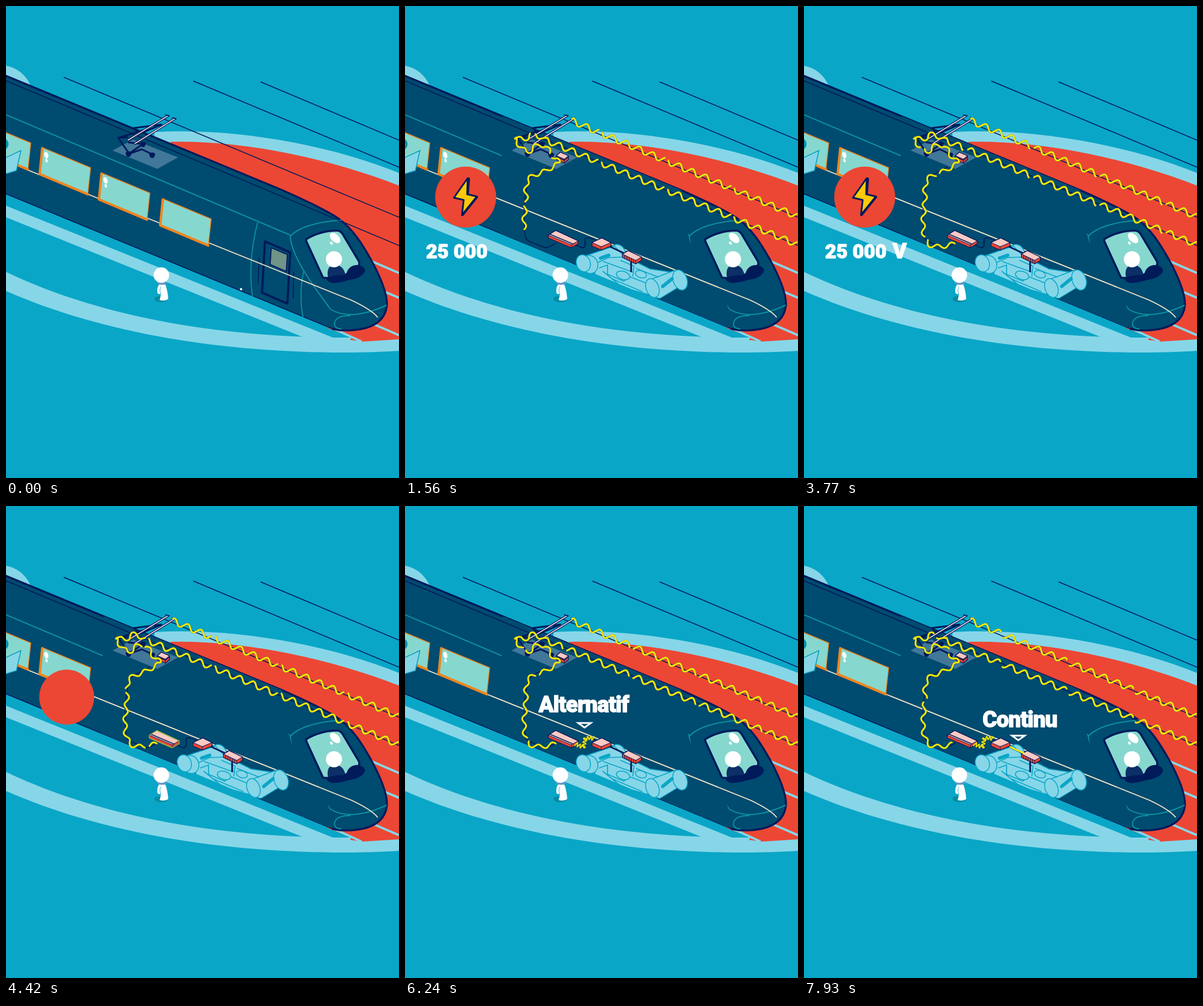
Animation, 683 px wide and 820 px high, one loop 8 s. Source, as an HTML page with a canvas:

```html
<!DOCTYPE html>
<html lang="fr">
<head>
<meta charset="utf-8">
<title>Train électrique</title>
<style>
html, body { margin: 0; width: 100%; height: 100%; overflow: hidden; background: #0aa6c7; }
canvas { display: block; width: 683px; height: 820px; }
</style>
</head>
<body>
<canvas id="stage"></canvas>
<script>
const LOOP = 8000, W = 683, H = 820;
const SEA = '#0aa6c7', PALE = '#86d6e8', RED = '#ec4734', BODY = '#004b70', NAVY = '#001a5a',
  GLASS = '#86d8cf', ORANGE = '#ee861e', CREAM = '#fbeccb', TEAL = '#0d919f', YELLOW = '#ffee00',
  PINK = '#fbc9c3', WHITE = '#ffffff', STEEL = '#417799';
const canvas = document.getElementById('stage');
const ctx = canvas.getContext('2d');
const ratio = window.devicePixelRatio || 1;
canvas.width = W * ratio;
canvas.height = H * ratio;
ctx.lineJoin = 'round';

const clamp = x => Math.max(0, Math.min(1, x));
const ramp = (t, start, dur) => clamp((t - start) / dur);
const backOut = p => 1 + 2.70158 * (p - 1) ** 3 + 1.70158 * (p - 1) ** 2;
const grow = (t, start, dur) => t < start ? 0 : backOut(ramp(t, start, dur));
const popInOut = (t, a, b) => grow(t, a, 350) * (1 - ramp(t, b, 220) ** 2);

function fill(path, color) {
  ctx.fillStyle = color;
  ctx.fill(path);
}
function stroke(path, color, width, cap = 'round') {
  ctx.strokeStyle = color;
  ctx.lineWidth = width;
  ctx.lineCap = cap;
  ctx.stroke(path);
}
const svg = d => new Path2D(d);
const line = (d, color, width, cap) => stroke(svg(d), color, width, cap);
const shape = (d, color) => fill(svg(d), color);

function oval(x, y, rx, ry, rot, color, edge, width) {
  const p = new Path2D();
  p.ellipse(x, y, rx, ry, rot, 0, Math.PI * 2);
  if (color) fill(p, color);
  if (edge) stroke(p, edge, width);
}
const disc = (x, y, r, color) => oval(x, y, r, r, 0, color);

function scaled(x, y, k, draw) {
  if (k <= 0) return;
  ctx.save();
  ctx.translate(x, y);
  ctx.scale(k, k);
  ctx.translate(-x, -y);
  draw();
  ctx.restore();
}

const roofLine = 'M-8 118L478 319Q555 353 579 370C603 388 618 412 634 440C652 473 663 500 662 520C659 547 638 560 604 563Q584 565 568 561';
const trainBody = svg(roofLine + 'L-8 323Z');
const stripe = 'M38 285L600 511Q636 528 646 541';
const coverShape = svg('M170 180L168 262Q152 282 149 305Q145 360 178 420L300 480L480 580L562 570L564 530Q535 460 497 413Q484 385 478 300L250 200Z');

function backdrop() {
  ctx.fillStyle = SEA;
  ctx.fillRect(0, 0, W, H);
  disc(-10, 160, 57, PALE);
  shape('M0 347L573 578L523 578L0 367Z', PALE);
  shape('M258 219C395 211 560 240 683 290V340H258Z', PALE);
  shape('M285 236C412 233 560 264 683 312V580L620 584H598V575L560 560L285 236Z', RED);
  shape('M0 462C180 548 400 577 600 576L598 580L620 583L683 579V599C655 601 620 602 590 602C380 602 170 570 0 495Z', PALE);
  line('M568 560L618 583', PALE, 4, 'butt');
  line('M630 441L683 464M650 493L683 507M630 549L683 572', PALE, 4, 'butt');
  line('M326 130.500L683 280M443 132L683 233M101 124L683 367', NAVY, 1.6);
}

function pane(x, y, shine) {
  ctx.save();
  ctx.translate(x, y);
  const p = svg('M5 0L89 35L84 81L0 46Z');
  fill(p, GLASS);
  stroke(p, ORANGE, 1.5);
  line('M5 1L0.500 46L84 81', ORANGE, 4.2);
  if (shine) {
    oval(12, 13, 3.5, 5.8, -0.3, WHITE);
    oval(12.500, 22.500, 2, 3.2, -0.2, WHITE);
  }
  ctx.restore();
}

function trainShell() {
  fill(trainBody, BODY);
  stroke(trainBody, NAVY, 1.6);
  line(roofLine, NAVY, 3.4);
  line('M0 189L494 398', TEAL, 2, 'butt');
  line('M437 377Q420 445 428 503', TEAL, 1.8);
  line('M517 462Q509 500 516 540', TEAL, 1.8);
  line('M583 372Q515 377 494 400C497 440 540 493 564 527Q600 548 661 520', TEAL, 2);
  line('M598 538C578 537 570 545 571 554Q572 560 582 561', TEAL, 2);
  line('M450 409L494 428L489 517L445 498Z', NAVY, 3.8);
  const glass = svg('M461 420L489 432L487 461L459 449Z');
  fill(glass, '#6f9488');
  stroke(glass, NAVY, 1.8);
  line('M440 437L438 481M500 463L499 507', NAVY, 1.5);
  disc(408.500, 492, 2, WHITE);
  line(stripe, CREAM, 1.8, 'butt');
  pane(161, 290, true);
  pane(267.500, 335, false);
}

function passengerEnd() {
  pane(-46, 203, false);
  pane(58, 246, true);
  disc(-6, 240, 10.5, '#0795b0');
  const book = svg('M-8 267L26 251L18 286L-8 294Z');
  fill(book, PALE);
  stroke(book, '#0a9dba', 1.5);
}

function cab() {
  const glass = svg('M522 405Q545 391 574 390Q581 390 585 396L613 443Q616 449 611 453L580 474L551 472L523 411Q521 407 522 405Z');
  fill(glass, GLASS);
  shape('M560 474Q555 450 572 450Q589 450 591 474Z', '#0b2f66');
  stroke(glass, NAVY, 3.6);
  shape('M556 472Q575 466 591 468Q594 451 609 450Q623 451 624 460Q619 473 596 476Q578 482 566 481Q558 479 556 472Z', NAVY);
  disc(570, 440, 14, WHITE);
  oval(572, 403, 6.500, 11, -0.8, WHITE);
  oval(565.500, 412, 2, 3, -0.7, WHITE);
}

function pantograph() {
  shape('M185 251L221 232L299 263L263 283Z', STEEL);
  line('M213 255L195 229L238 216M213 257L239 239M195 229L211 228M239 240L213 237M236 249L255 258M213 257L236 249M222 212L270 206L232 222L222 212', NAVY, 3);
  for (const [x, y] of [[213, 256], [238, 239], [254, 258]]) {
    oval(x, y, 5.3, 3.6, 0, NAVY);
    disc(x, y + 2, 4, NAVY);
  }
  const bars = 'M212 233L281 191M224 239L293 196';
  line(bars, NAVY, 4);
  line(bars, '#f5dce0', 1.5);
  line('M277 189L284 191M289 194L296 196', NAVY, 1.5);
}

function bogie() {
  const part = d => { const p = svg(d); fill(p, PALE); stroke(p, SEA, 1.4); };
  const wheel = (x, y, rx, ry) => oval(x, y, rx, ry, -0.35, PALE, SEA, 1.5);
  wheel(370, 430, 13, 16);
  part('M314 434L364 417L380 434L374 446L322 464Z');
  part('M330 448L354 437L384 436L426 457L466 463L470 480L440 506L394 493L330 466Z');
  wheel(321, 449, 14, 16);
  wheel(310, 447, 12, 15);
  part('M424 476L470 459Q484 463 486 482L443 508Q428 506 424 496Z');
  wheel(478, 476, 12, 18);
  wheel(430, 490, 11, 17);
  line('M338 455L352 450L352 466L380 478L390 470L418 481M345 444L395 462M375 442L398 452L396 469M402 456L440 471M360 474L412 496M344 461L372 484', SEA, 1.7);
  oval(379, 468, 12, 7, 0.3, PALE, SEA, 1.5);
  oval(410, 466, 10, 6, 0.3, PALE, SEA, 1.5);
  line('M448 487L464 474M340 438L354 433', SEA, 6);
}

// Isometric box: back, right, front and left corners of the lid, then its depth.
function box(b, r, f, l, depth, rib) {
  const poly = pts => svg('M' + pts.map(p => p.join(' ')).join('L') + 'Z');
  const drop = p => [p[0], p[1] + depth];
  const all = poly([b, r, drop(r), drop(f), drop(l), l]);
  fill(all, RED);
  fill(poly([b, r, f, l]), PINK);
  stroke(all, NAVY, 1.3);
  stroke(poly([b, r, f, l]), NAVY, 1);
  line(`M${f}L${drop(f)}`, NAVY, 1);
  if (rib) for (let k = 1; k < rib; k++) {
    const u = k / rib, x = l[0] + (f[0] - l[0]) * u, y = l[1] + (f[1] - l[1]) * u;
    line(`M${x} ${y}v${depth}`, NAVY, 1);
  }
  return all;
}

function machinery(t) {
  bogie();
  line('M249 280L224 293Q215 297 213 309Q203 350 209 400Q210 406 216 409L241 419Q248 421 253 417L263 412', NAVY, 1.6);
  line('M298 416L308 420Q313 420 313 414V406Q313 402 320 403L330 406', NAVY, 1.8);
  line('M354 417L384 431', NAVY, 3);
  line('M393 443V461', NAVY, 3);
  const first = box([262, 390], [301, 408], [289, 415], [249, 398], 5);
  line('M252 396.500L292 413.500', NAVY, 1.6);
  const second = box([342, 403], [358, 411], [341, 418], [325, 411], 6);
  box([388, 425], [411, 436], [401, 442], [378, 431], 6, 6);
  box([270, 254], [284, 260], [277, 266], [263, 260], 7);
  line('M264 262L277 268L284 262', NAVY, 1.5);
  const glow = (p, start) => {
    ctx.save();
    ctx.globalAlpha = Math.sin(Math.PI * ramp(t, start, 500));
    stroke(p, '#a6c63c', 1.4);
    ctx.restore();
  };
  glow(first, 4200);
  glow(second, 6300);
}

// Smooth curve through a few points, sampled with running length and normals.
function track(pts) {
  const out = [];
  let s = 0;
  for (let i = 0; i < pts.length - 1; i++) {
    const a = pts[Math.max(0, i - 1)], b = pts[i], c = pts[i + 1], d = pts[Math.min(pts.length - 1, i + 2)];
    const n = Math.ceil(Math.hypot(c[0] - b[0], c[1] - b[1]) / 1.2);
    const mix = (u, k) => pts.length < 3 ? b[k] + (c[k] - b[k]) * u :
      0.5 * (2 * b[k] + (c[k] - a[k]) * u + (2 * a[k] - 5 * b[k] + 4 * c[k] - d[k]) * u * u
      + (3 * b[k] - a[k] - 3 * c[k] + d[k]) * u ** 3);
    for (let j = i ? 1 : 0; j <= n; j++) {
      const x = mix(j / n, 0), y = mix(j / n, 1), last = out[out.length - 1];
      if (last) s += Math.hypot(x - last.x, y - last.y);
      out.push({ x, y, s });
    }
  }
  out.forEach((p, i) => {
    const a = out[Math.max(0, i - 1)], b = out[Math.min(out.length - 1, i + 1)];
    const len = Math.hypot(b.x - a.x, b.y - a.y) || 1;
    p.nx = -(b.y - a.y) / len;
    p.ny = (b.x - a.x) / len;
  });
  return out;
}

const overhead = track([[683, 366], [289, 199]]);
const rail = track([[683, 415], [245, 233]]);
const feed = track([[245, 233], [222, 223], [207, 232], [190, 229], [211, 253], [228, 243], [244, 244],
  [259, 265], [268, 272], [245, 286], [214, 302], [210, 340], [207, 385], [215, 412], [235, 418], [262, 413]]);
const railEnd = rail[rail.length - 1].s;
const jumper = track([[296, 413], [310, 418], [314, 404], [329, 404]]);

function wave(path, head, from, amp, length, width, t, gaps) {
  const p = new Path2D();
  let pen = false;
  for (const q of path) {
    const s = q.s + from;
    if (s > head) break;
    const phase = (((s - 367 - 0.2536 * (t - 1040)) % 124.8) + 124.8) % 124.8;
    if (gaps && (phase < 3.2 || phase > 121.600)) { pen = false; continue; }
    const off = amp * Math.sin(2 * Math.PI * (s / length + 0.22));
    const x = q.x + q.nx * off, y = q.y + q.ny * off;
    pen ? p.lineTo(x, y) : p.moveTo(x, y);
    pen = true;
  }
  stroke(p, '#87972d', width + 1);
  stroke(p, YELLOW, width);
}

function current(t) {
  wave(overhead, 0.54 * (t - 290), 0, 5, 24.96, 2.4, t, true);
  const head = 0.54 * (t - 90);
  wave(rail, head, 0, 5, 24.96, 2.4, t, true);
  wave(feed, head, railEnd, 3.6, 24.96, 2.4, t, true);
  if (t > 4600) wave(jumper, (t - 4600) * 0.1, 0, 3.4, 5.2, 1.4, t, false);
  const u = ramp(t, 6600, 250);
  if (u > 0) line(`M357 418L${357 + 26 * u} ${418 + 12 * u}`, YELLOW, 2.6, 'butt');
}

function write(text, x, y, size, align = 'left', spacing = 0) {
  ctx.font = `900 ${size}px Roboto, "Open Sans", sans-serif`;
  ctx.textAlign = align;
  ctx.letterSpacing = spacing + 'px';
  ctx.fillStyle = ctx.strokeStyle = WHITE;
  ctx.lineWidth = 1.3;
  ctx.fillText(text, x, y);
  ctx.strokeText(text, x, y);
  ctx.letterSpacing = '0px';
}

function voltage(t) {
  scaled(105.500, 332, grow(t, 1030, 400) * (1 - ramp(t, 4345, 240) ** 2), () => disc(105.500, 332, 53, RED));
  scaled(105.500, 332, popInOut(t, 1180, 4130), () => {
    const bolt = svg('M109 299L85 333L102 337L99 363L125 331L108 327Z');
    fill(bolt, '#fcc90a');
    stroke(bolt, NAVY, 3);
    line('M111 300L109 327M100 363L125 332', NAVY, 4);
  });
  const digits = '25 000';
  const shown = Math.min(Math.floor((t - 1250) / 50), digits.length - Math.floor(Math.max(0, t - 4100) / 40));
  if (shown > 0) write(digits.slice(0, shown), 36.500, 438, 34);
  scaled(167, 425, popInOut(t, 1600, 4060), () => write('V', 154, 438, 37));
}

function label(t, text, x, y, tipX, tipY, start, end) {
  scaled(tipX, tipY, popInOut(t, start, end), () => {
    write(text, x, y, 38.5, 'center', -0.9);
    ctx.lineJoin = 'miter';
    line(`M${tipX - 11} ${tipY - 9}h22l-11 8Z`, WHITE, 3);
    ctx.lineJoin = 'round';
  });
}

function bystander() {
  oval(270, 509, 12, 5.5, 0, '#078ba2');
  shape('M266 484H277Q281 495 282 509Q277 513 267 511Q269 505 269 500Q262 502 263 494Q263 488 266 484Z', WHITE);
  line('M269 488Q266 494 269 500', SEA, 0.8);
  line('M264 481Q271 485 278 481', '#7194c8', 3);
  disc(270, 467.500, 13.5, WHITE);
}

function draw(t) {
  ctx.setTransform(ratio, 0, 0, ratio, 0, 0);
  backdrop();
  trainShell();
  passengerEnd();
  const open = grow(t, 550, 650);
  const region = new Path2D();
  if (open > 0) {
    region.addPath(coverShape, new DOMMatrix().translate(330, 390).scale(open).translate(-330, -390));
    ctx.save();
    ctx.clip(trainBody);
    fill(region, BODY);
    ctx.clip(region);
    line(stripe, CREAM, 1.8, 'butt');
    ctx.restore();
  }
  line('M-2 129L683 416', NAVY, 1.6);
  cab();
  pantograph();
  if (open > 0) {
    ctx.save();
    ctx.clip(region);
    machinery(t);
    ctx.restore();
  }
  current(t);
  bystander();
  voltage(t);
  label(t, 'Alternatif', 310.500, 358, 312, 386, 5000, 6450);
  label(t, 'Continu', 375, 384, 372.500, 408, 6950, 9000);
}

const begin = performance.now();
function tick() {
  draw((performance.now() - begin) % LOOP);
  requestAnimationFrame(tick);
}
tick();
</script>
</body>
</html>
```
